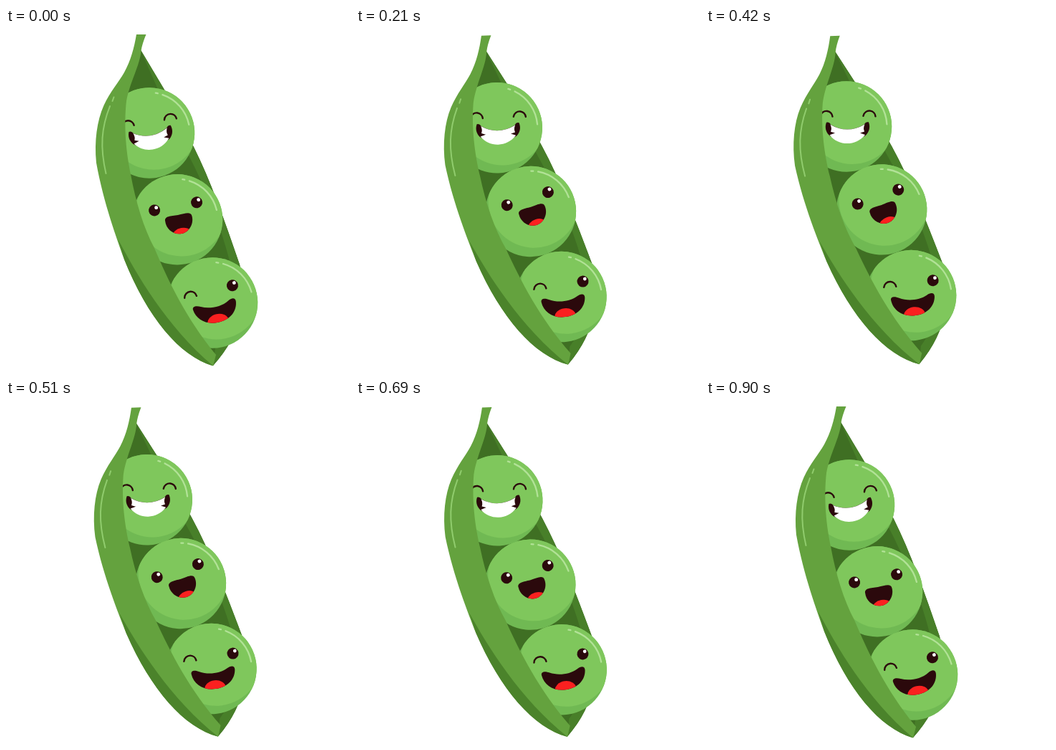
An HTML page with a canvas for the animation above (930 ms loop, 480 by 480 pixels).

```html
<!DOCTYPE html>
<html lang="en">
<head>
<meta charset="utf-8">
<title>Peas in a pod</title>
<style>
html, body { margin: 0; width: 100%; height: 100%; overflow: hidden; background: #fff; }
canvas { display: block; width: 480px; height: 480px; }
</style>
</head>
<body>
<canvas id="stage" width="480" height="480"></canvas>
<script>
const ctx = document.getElementById('stage').getContext('2d');
const LOOP = 930, STEP = 30, SWAY = 300, LAG = 5;
const INK = '#2b090c', RED = '#fb2020', SHINE = '#b2e297';
const rad = deg => deg * Math.PI / 180;
const mix = (a, b, k) => a + (b - a) * k;

const pod = {
  back: new Path2D('M187 29 L221 86 L262 166 C285 212 304 266 326 330 C337 375 331 425 289 471 C220 400 160 240 164 100 Z'),
  backEdge: new Path2D('M187 29 L221 86 L262 166 C285 212 304 266 326 330 C337 375 331 425 289 471 L292 446 C318 415 322 375 312 325 C300 278 280 226 254 176 L214 90 Z'),
  front: new Path2D('M182 9 L195.500 9 Q190 22 188.500 32 C187 52 173 75 168 102 C164 138 168 176 174 204 C181 243 192 279 207 307 C226 352 251 405 293 456 L289 471.500 C242 458 197 403 165 323 C155 295 136 244 126 188 C123 158 127 129 136.500 108 C146 88 157 76 165 62 C174 46 179 27 182 9 Z'),
  under: new Path2D('M156.500 295 C181 342 224 417 289 471.500 C242 458 197 403 165 323 Z'),
  shine: new Path2D('M150.500 96.500 L148.500 102 M145 109 C133 139 131 166 139.500 203')
};

function stroke(color, width, path) {
  ctx.strokeStyle = color;
  ctx.lineWidth = width;
  ctx.lineCap = 'round';
  ctx.stroke(path);
}

function fill(path, color) {
  ctx.fillStyle = color;
  ctx.fill(path);
}

function arc(x, y, r, from = 0, to = 360) {
  const path = new Path2D();
  path.arc(x, y, r, rad(from), rad(to));
  return path;
}

function openEye(x, y) {
  fill(arc(x, y, 8), INK);
  fill(arc(x + 3.2, y - 3.2, 2.4), '#fff');
}

function closedEye(x, y) {
  stroke(INK, 2.4, arc(x, y, 8.6, 190, 355));
}

function laugh(outline, x, y, rx, ry) {
  const mouth = new Path2D(outline);
  const tongue = new Path2D();
  tongue.ellipse(x, y, rx, ry, 0, 0, 2 * Math.PI);
  fill(mouth, INK);
  ctx.save();
  ctx.clip(mouth);
  fill(tongue, RED);
  ctx.restore();
}

function grinFace() {
  closedEye(-28, -13.2);
  closedEye(32, -13.2);
  fill(new Path2D('M-28 -6 Q-24 -7 -22 -3 Q1 11 25 -3 Q27 -7 31 -6 C34 2 31 9 26 13 Q1 24 -23 13 C-28 9 -31 2 -28 -6 Z'), INK);
  fill(new Path2D('M-22.500 -3 Q1 11 25.500 -3 Q23 2 25 7 L19 9 L26 11.500 C19 20 10 23.500 1 23.500 C-8 23.500 -17 20 -23.500 11.500 L-16 9 L-22 7 Q-20 2 -22.500 -3 Z'), '#fff');
}

function happyFace() {
  openEye(-29, -18.5);
  openEye(31, -18.5);
  laugh('M-17 -1 C-17 -8 -8 -6.500 2 -6 C12 -6.500 21 -8 21 -1 C22 10 13 20.500 2 20.500 C-9 20.500 -18 10 -17 -1 Z', 3, 21, 13, 8.5);
}

function winkFace() {
  closedEye(-28, -13.5);
  openEye(32.5, -17.5);
  laugh('M-28.500 4 C-29 -2 -22 -1 -17 2 C-5 8 11 8 22 2 C27 -1 33 -1 32.500 5 C31 19 19 28.500 2 28.500 C-15 28.500 -27 18 -28.500 4 Z', 2, 28, 15, 11.5);
}

// Each pea sways between two poses: [x, y, tilt in degrees].
const peas = [
  { from: [200, 146.5, -9], to: [195.4, 136.2, 1], face: grinFace },
  { from: [239, 267.3, -10.6], to: [246, 251.3, -20.6], face: happyFace },
  { from: [288, 383.5, -12.6], to: [285.8, 371.5, -5], face: winkFace }
];

function drawPea({ from, to, face }, k) {
  const [x, y, tilt] = from.map((v, i) => mix(v, to[i], k));
  const body = arc(0, 0, 63.2);
  ctx.save();
  ctx.translate(x, y);
  ctx.rotate(rad(tilt));
  fill(body, '#70b953');
  ctx.save();
  ctx.clip(body);
  fill(arc(8, -11, 63.5), '#7fc75c');
  ctx.restore();
  stroke(SHINE, 2.3, arc(0, 0, 56.5, -72, -69));
  stroke(SHINE, 2.3, arc(0, 0, 56.5, -62, -3));
  face();
  ctx.restore();
}

function drawPod(k, parts) {
  ctx.save();
  ctx.translate(235, 240);
  ctx.rotate(rad(-2.5 * k));
  ctx.translate(-235, -240);
  parts();
  ctx.restore();
}

function draw(time) {
  const t = Math.floor(time % LOOP / STEP) * STEP;
  const k = (1 - Math.cos(2 * Math.PI * (t - LAG) / SWAY)) / 2;
  ctx.fillStyle = '#fff';
  ctx.fillRect(0, 0, 480, 480);
  drawPod(k, () => {
    fill(pod.back, '#3f6f23');
    fill(pod.backEdge, '#487f29');
  });
  peas.forEach(pea => drawPea(pea, k));
  drawPod(k, () => {
    fill(pod.front, '#64a23e');
    fill(pod.under, '#4b832b');
    stroke('#90cc6d', 2, pod.shine);
  });
}

const start = performance.now();
function tick() {
  draw(performance.now() - start);
  requestAnimationFrame(tick);
}
tick();
</script>
</body>
</html>
```
